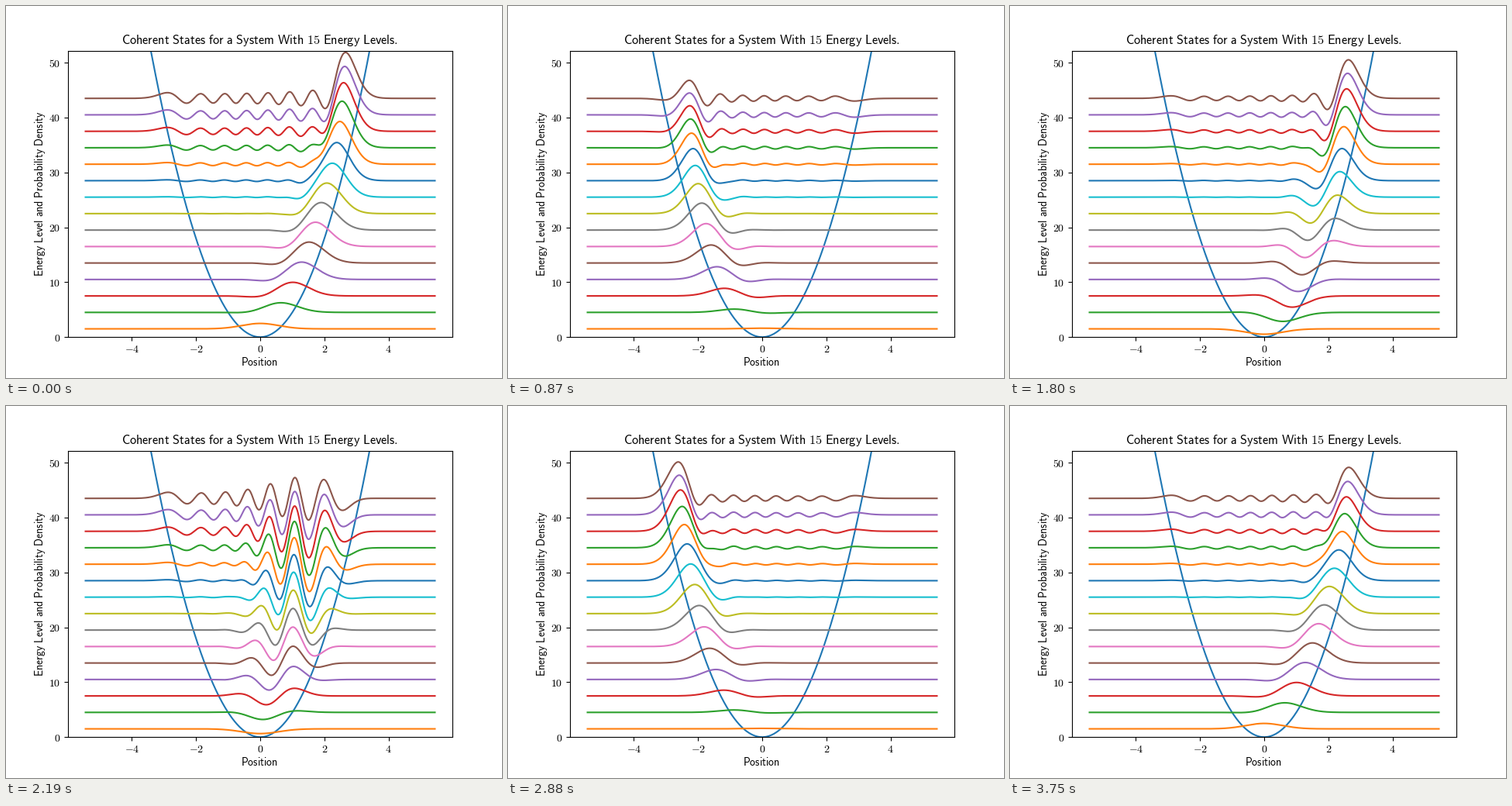
Recreate the animation shown at these times as a matplotlib script. Size 640 by 480 pixels, loop 3780 ms.

```python
import math

import matplotlib.pyplot as plt
import numpy as np
from matplotlib.animation import FuncAnimation

W, H, DPI = 640, 480, 100
LEVELS = 15
OMEGA = 3.0
FRAMES, INTERVAL = 126, 30
DT = 1 / 30

plt.rcParams["mathtext.fontset"] = "cm"


def sans(text):
    return r"$\mathsf{" + text.replace(" ", r"\ ") + "}$"


def eigenstates(x):
    """Harmonic oscillator wave functions, one row per level."""
    xi = math.sqrt(OMEGA) * x
    psi = [(OMEGA / math.pi) ** 0.25 * np.exp(-xi**2 / 2)]
    psi.append(math.sqrt(2) * xi * psi[0])
    for n in range(1, LEVELS - 1):
        psi.append(math.sqrt(2 / (n + 1)) * xi * psi[n]
                   - math.sqrt(n / (n + 1)) * psi[n - 1])
    return np.array(psi)


def poisson(mean):
    return [math.exp(-mean) * mean**n / math.factorial(n)
            for n in range(LEVELS)]


energy = OMEGA * (np.arange(LEVELS) + 0.5)
reach = 1.75 * math.sqrt(2 * energy[-1]) / OMEGA
x = np.linspace(-reach, reach, 600)
psi = eigenstates(x)
# Each row mixes the levels around one mean, scaled with its energy.
weights = np.array([(2 * k + 1) * np.array(poisson(k)) for k in range(LEVELS)])

fig = plt.figure(figsize=(W / DPI, H / DPI), dpi=DPI, facecolor="white")
ax = fig.add_axes([0.125, 0.11, 0.775, 0.77])
ax.plot(x, 0.5 * OMEGA**2 * x**2, color="C0")
curves = [ax.plot(x, np.full_like(x, e), color=f"C{(k + 1) % 10}")[0]
          for k, e in enumerate(energy)]

ax.set_xlim(-1.1 * reach, 1.1 * reach)
ax.set_ylim(0, 1.2 * energy[-1])
ax.set_xticks(range(-4, 5, 2))
ax.set_yticks(range(0, 51, 10))
ax.xaxis.set_major_formatter(lambda v, _: f"${v:.0f}$")
ax.yaxis.set_major_formatter(lambda v, _: f"${v:.0f}$")
ax.tick_params(axis="x", pad=2.6)

ax.set_title(sans("Coherent States for a System With 15 Energy Levels."),
             fontsize=11.66)
label = dict(ha="center", va="baseline", rotation_mode="anchor", fontsize=9.96)
fig.text(327 / W, 1 - 464.3 / H, sans("Position"), **label)
fig.text(48.1 / W, 1 - 242.4 / H,
         sans("Energy Level and Probability Density"), rotation=90, **label)


def update(i):
    phase = np.cos(energy * i * DT)
    waves = (weights * phase) @ psi
    for curve, e, wave in zip(curves, energy, waves):
        curve.set_ydata(e + wave)
    return curves


anim = FuncAnimation(fig, update, frames=FRAMES, interval=INTERVAL,
                     init_func=lambda: update(0), repeat=True, repeat_delay=0)
plt.show()
```
